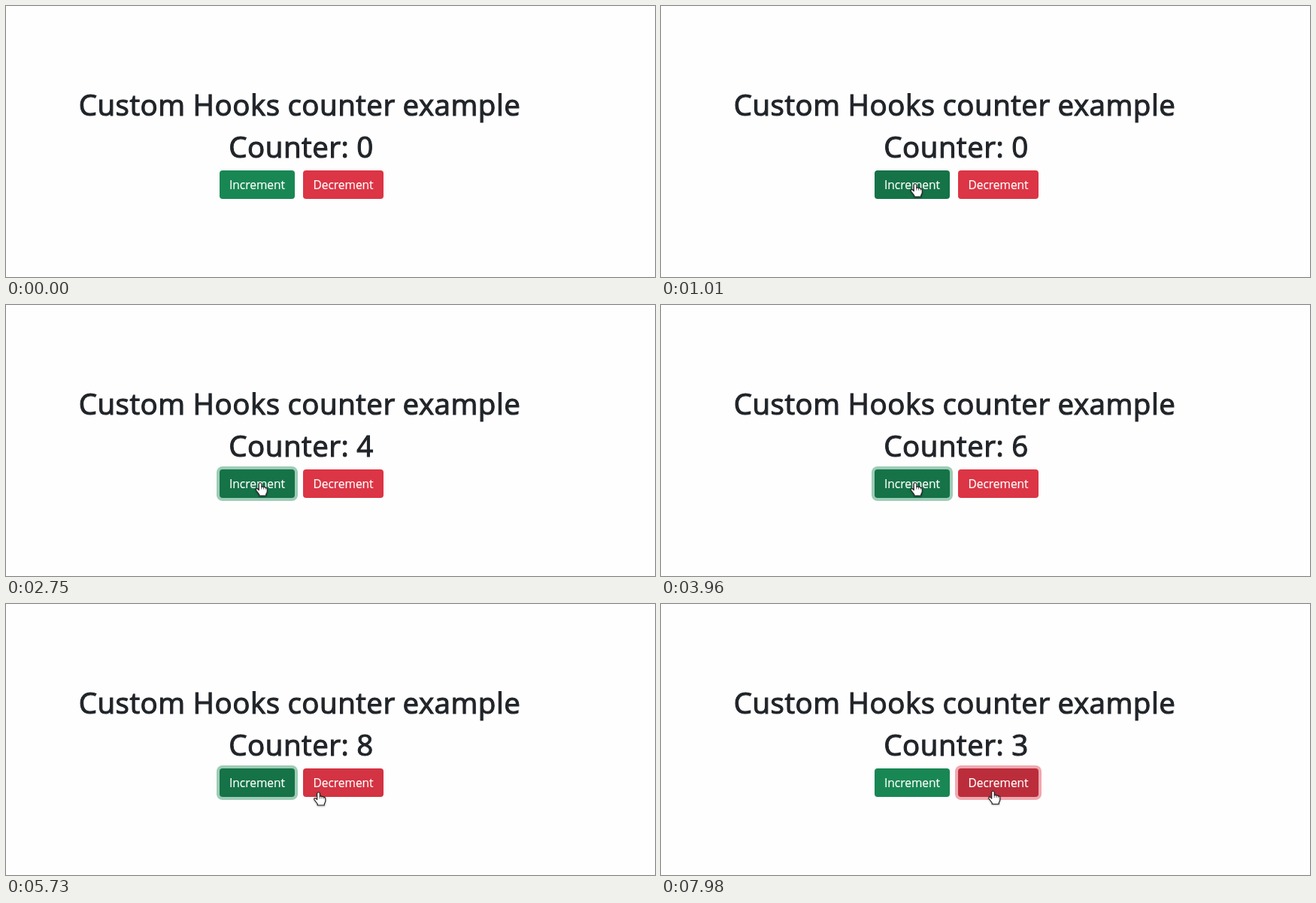
Animation of 863x361 px, one loop 8000 ms. Source, as an HTML page:

```html
<!DOCTYPE html>
<html lang="en">
<head>
<meta charset="utf-8">
<title>Counter</title>
<style>
  html, body { margin: 0; width: 100%; height: 100%; overflow: hidden; background: #fefefe; }
  svg { display: block; width: 100%; height: 100%; }
  text { font-family: "Open Sans", "Noto Sans", sans-serif; }
  /* the thin stroke stands in for a medium weight */
  .title { font-size: 38.5px; letter-spacing: .5px; word-spacing: -.6px; fill: #212529; stroke: #212529; stroke-width: 1.1; }
  .label { font-size: 15.5px; fill: #fff; stroke: #fff; stroke-width: .2; text-anchor: middle; }
  .cursor path { fill: #fff; stroke: #222; stroke-width: 1.2; stroke-linejoin: round; }
  .cursor { filter: drop-shadow(0 1px 1px rgba(0, 0, 0, .35)); }
</style>
</head>
<body>
<svg viewBox="0 0 863 361">
  <text class="title" x="96.7" y="146">Custom Hooks counter example</text>
  <text class="title" x="296.3" y="202">Counter: <tspan id="count">0</tspan></text>
  <rect id="incRing" x="280" y="215" width="108" height="46" rx="8" fill="#9dccb6"/>
  <rect id="decRing" x="391" y="215" width="115" height="46" rx="8" fill="#f0a9b0"/>
  <rect id="inc" x="284" y="219" width="100" height="38" rx="4"/>
  <rect id="dec" x="395" y="219" width="107" height="38" rx="4"/>
  <text class="label" x="334" y="244">Increment</text>
  <text class="label" x="448.5" y="244">Decrement</text>
  <g id="cursor" class="cursor">
    <path id="arrow" d="M0 0V15.5L3.6 12.2L6.2 18L8.7 16.9L6.2 11.2H11Z"/>
    <g id="hand">
      <path d="M-1.8 1.5Q0 -1 1.8 1.5V6Q3.2 4.9 4.5 6.2Q6 5.4 7.1 6.9Q9.4 6.7 9.3 9.4V12Q9 14 7.8 15.4V17.5H-1.2V16Q-3 13.4 -5.7 10Q-6 7.7 -4 8.1L-1.8 10Z"/>
      <path d="M1.8 6V9M4.5 6.4V9M7.1 7V9.2" style="stroke-width:.7"/>
    </g>
  </g>
</svg>
<script>
const LOOP = 8000, FADE = 150;
const FOCUS_INC = 1140, HOVER_DEC = 5680, FOCUS_DEC = 6110;
const $ = id => document.getElementById(id);

// [time, value]: the value holds until the next row
const counts = [[0, 0], [1260, 1], [1700, 2], [2280, 3], [2750, 4], [3470, 5], [3820, 6],
  [4350, 7], [4700, 8], [6200, 7], [6790, 6], [7180, 5], [7560, 4], [7980, 3]];

// [time, x, y, shape]
const moves = [
  [0, 0, 0, ''], [160, 366, 350, 'arrow'], [250, 362, 328, 'arrow'], [340, 357, 304, 'arrow'],
  [430, 352, 284, 'arrow'], [520, 348, 267, 'arrow'], [610, 344, 254, 'hand'],
  [700, 341, 245, 'hand'], [780, 339, 240, 'hand'], [870, 338, 236.5, 'hand'],
  [5080, 341, 240, 'hand'], [5180, 347, 245, 'hand'], [5270, 356, 250, 'hand'],
  [5360, 368, 253, 'hand'], [5450, 381, 255, 'hand'], [5540, 390, 254, 'arrow'],
  [5640, 403, 252, 'hand'], [5730, 415.5, 250.5, 'hand'], [5830, 436, 249.5, 'hand'],
  [5910, 441.5, 249, 'hand']
];

// [time, colour]: each row fades in from the one before
const incFill = [[0, '#198754'], [610, '#157347'], [FOCUS_DEC, '#198754']];
const decFill = [[0, '#dc3545'], [HOVER_DEC, '#bb2d3b']];

const rowAt = (rows, t) => rows.findLastIndex(r => r[0] <= t);
const ease = k => k * k * (3 - 2 * k);
const fade = (t, from) => ease(Math.min(1, Math.max(0, (t - from) / FADE)));
const rgb = hex => [1, 3, 5].map(i => parseInt(hex.slice(i, i + 2), 16));

function colourAt(rows, t) {
  const i = rowAt(rows, t);
  if (!i) return rows[0][1];
  const from = rgb(rows[i - 1][1]), to = rgb(rows[i][1]), k = fade(t, rows[i][0]);
  return `rgb(${from.map((v, j) => Math.round(v + (to[j] - v) * k))})`;
}

function draw(t) {
  $('count').textContent = counts[rowAt(counts, t)][1];
  $('inc').setAttribute('fill', colourAt(incFill, t));
  $('dec').setAttribute('fill', colourAt(decFill, t));
  $('incRing').setAttribute('opacity', fade(t, FOCUS_INC) - fade(t, FOCUS_DEC));
  $('decRing').setAttribute('opacity', fade(t, FOCUS_DEC));
  const [, x, y, shape] = moves[rowAt(moves, t)];
  $('cursor').setAttribute('transform', `translate(${x} ${y})`);
  for (const id of ['arrow', 'hand']) $(id).style.display = id === shape ? '' : 'none';
}

const start = performance.now();
function tick() {
  draw((performance.now() - start) % LOOP);
  requestAnimationFrame(tick);
}
tick();
</script>
</body>
</html>
```
